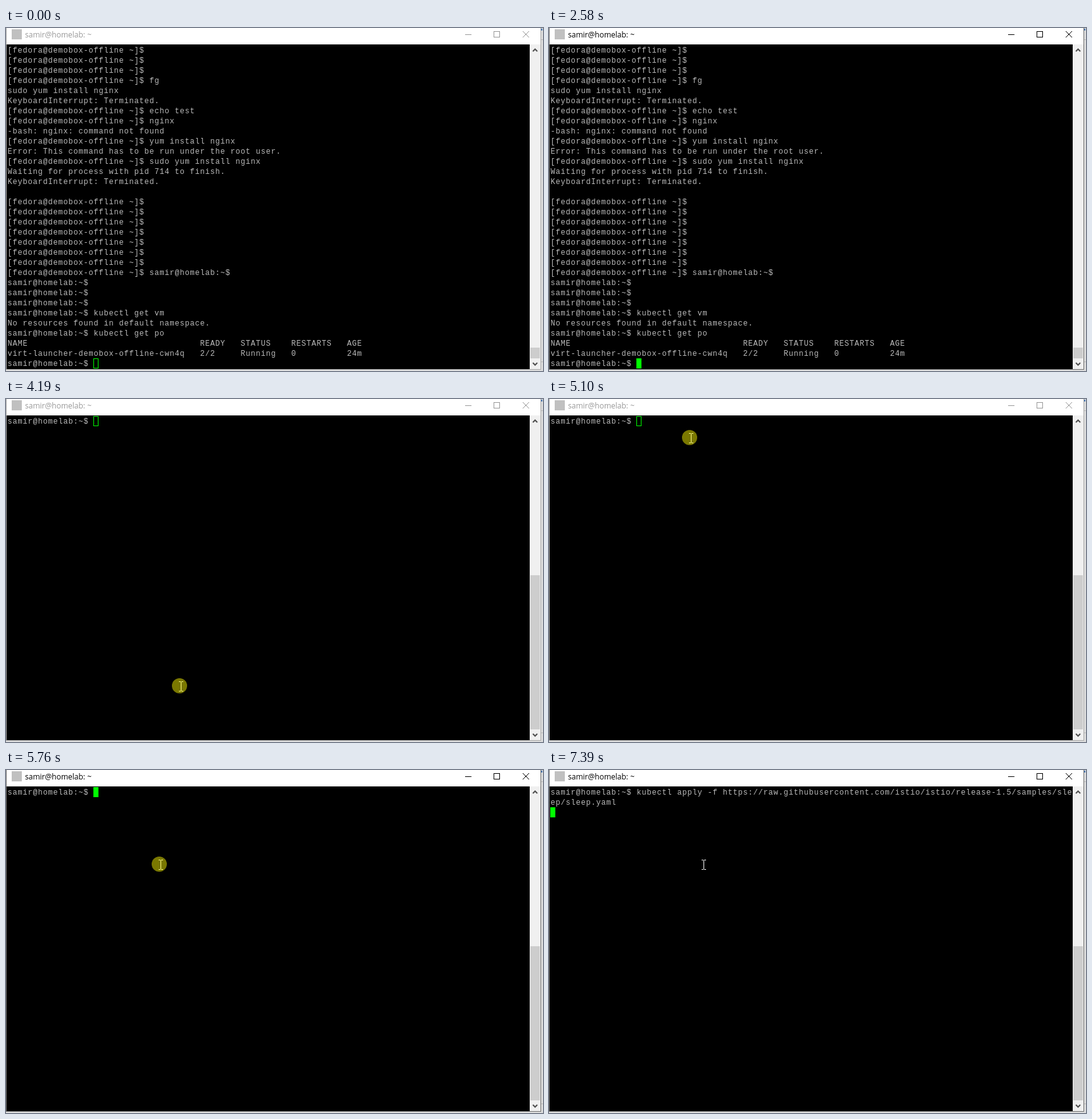
Animation, 848 px wide and 543 px high, one loop 8000 ms. Source, as an HTML page with a canvas:

```html
<!DOCTYPE html>
<html lang="en">
<head>
<meta charset="utf-8">
<title>Terminal session</title>
<style>
  html, body { margin: 0; width: 848px; height: 543px; overflow: hidden; background: #dcdcdc; }
  canvas { display: block; }
</style>
</head>
<body>
<canvas id="stage" width="848" height="543"></canvas>
<script>
const ctx = document.getElementById('stage').getContext('2d');
const LOOP = 8000;
const CELL_W = 8;
const CELL_H = 16;
const COLS = 103;
const USER = 'samir@homelab';
const GUEST = 'demobox-offline';
const shell = USER + ':~$ ';
const remote = `[fedora@${GUEST} ~]$ `;
const repeat = (line, n) => Array(n).fill(line);
const row = (name, ready, status, restarts, age) =>
  name.padEnd(38) + ready.padEnd(8) + status.padEnd(10) + restarts.padEnd(11) + age;

const history = [
  ...repeat(remote, 3),
  remote + 'fg',
  'sudo yum install nginx',
  'KeyboardInterrupt: Terminated.',
  remote + 'echo test',
  remote + 'nginx',
  '-bash: nginx: command not found',
  remote + 'yum install nginx',
  'Error: This command has to be run under the root user.',
  remote + 'sudo yum install nginx',
  'Waiting for process with pid 714 to finish.',
  'KeyboardInterrupt: Terminated.',
  '',
  ...repeat(remote, 7),
  remote + shell,
  ...repeat(shell, 3),
  shell + 'kubectl get vm',
  'No resources found in default namespace.',
  shell + 'kubectl get po',
  row('NAME', 'READY', 'STATUS', 'RESTARTS', 'AGE'),
  row(`virt-launcher-${GUEST}-cwn4q`, '2/2', 'Running', '0', '24m'),
  shell
];
const command = shell + 'kubectl apply -f https://raw.githubusercontent.com/' +
  'istio/istio/release-1.5/samples/sleep/sleep.yaml';
const pasted = [command.slice(0, COLS), command.slice(COLS)];

// Each entry holds until the next: [start ms, value]
const screens = [[0, history], [4190, [shell]], [6140, pasted], [7390, [...pasted, '']]];
const focus = [[0, false], [440, true], [4040, false], [5760, true]];

// Mouse: [start ms, [x, y, highlighted]] or null while hidden
const mouse = [
  [0, null],
  [70, [525, 434, true]], [120, [517, 422, true]], [160, [508, 409, true]],
  [210, [501, 399, true]], [440, [490, 394, true]], [510, [490, 394, false]],
  [1140, [404, 489, false]], [1210, null],
  [2080, [294, 514, false]], [2160, [294, 505, false]],
  [2510, [293, 504, false]], [2580, null],
  [4190, [276, 455, true]], [4260, [241, 258, true]], [4560, [215, 86, true]],
  [5100, [224, 62, true]], [5180, [242, 31, true]], [5260, [257, 13, true]],
  [5350, [264, 22, true]], [5430, [255, 74, true]], [5530, [244, 124, true]],
  [5600, [244, 150, true]], [5990, [244, 150, false]],
  [6140, [244, 150, true]], [6240, [244, 150, false]]
];

const at = (track, t) => track.findLast(([start]) => start <= t)[1];

function box(color, x, y, w, h) {
  ctx.fillStyle = color;
  ctx.fillRect(x, y, w, h);
}

function lines(color, width, ...paths) {
  ctx.strokeStyle = color;
  ctx.lineWidth = width;
  ctx.beginPath();
  for (const path of paths)
    path.forEach(([x, y], i) => i ? ctx.lineTo(x, y) : ctx.moveTo(x, y));
  ctx.stroke();
}

function drawWindow(active, thumbTop) {
  box('#dcdcdc', 0, 0, 848, 543);
  box('#b8b8b8', 845, 18, 3, 1);
  box('#b8b8b8', 845, 528, 3, 1);
  box('#4a7ab5', 845, 1, 2, 3);
  box(active ? '#707070' : '#aaaaaa', 0, 0, 845, 541);
  box('#fff', 1, 0, 843, 26);
  box('#000', 1, 26, 826, 514);

  const ink = active ? '#000' : '#999';
  box('#c0c0c0', 9, 2, 16, 16);
  ctx.fillStyle = ink;
  ctx.font = '12px "Open Sans", "Noto Sans", sans-serif';
  ctx.letterSpacing = '0px';
  ctx.fillText(USER + ': ~', 30, 15);
  box(ink, 725, 10, 10, 1);
  ctx.strokeStyle = ink;
  ctx.lineWidth = 1;
  ctx.strokeRect(770.5, 5.5, 9, 9);
  lines(ink, 1, [[816, 5], [826, 15]], [[826, 5], [816, 15]]);

  box('#f0f0f0', 827, 26, 17, 514);
  box('#cdcdcd', 828, thumbTop, 15, 523 - thumbTop);
  lines('#505050', 2, [[832, 37], [835.5, 33.5], [839, 37]],
    [[832, 530], [835.5, 533.5], [839, 530]]);
}

function drawTerminal(text, active) {
  ctx.fillStyle = '#bbb';
  ctx.font = '12px "Liberation Mono", "DejaVu Sans Mono", monospace';
  ctx.letterSpacing = '0px';
  // Centre each glyph in its terminal cell
  const gap = CELL_W - ctx.measureText('0').width;
  ctx.letterSpacing = gap + 'px';
  text.forEach((line, i) => ctx.fillText(line, 2 + gap / 2, 39 + CELL_H * i));

  const x = 2 + CELL_W * text.at(-1).length;
  const y = 27 + CELL_H * (text.length - 1);
  if (active) return box('#0f0', x, y, CELL_W, CELL_H);
  ctx.strokeStyle = '#0f0';
  ctx.lineWidth = 1;
  ctx.strokeRect(x + .5, y + .5, CELL_W - 1, CELL_H - 1);
}

function drawMouse([x, y, highlighted]) {
  box('#fff', x, y - 7, 1, 14);
  for (const edge of [y - 8, y + 7]) {
    box('#fff', x - 3, edge, 3, 1);
    box('#fff', x + 1, edge, 3, 1);
  }
  if (!highlighted) return;
  ctx.fillStyle = 'rgba(255, 250, 0, .48)';
  ctx.beginPath();
  ctx.arc(x - 2, y - 1, 12, 0, Math.PI * 2);
  ctx.fill();
}

function draw(now) {
  const t = now % LOOP;
  const active = at(focus, t);
  const text = at(screens, t);
  const pointer = at(mouse, t);
  drawWindow(active, text === history ? 506 : 279);
  drawTerminal(text, active);
  if (pointer) drawMouse(pointer);
}

const begin = performance.now();
function tick() {
  draw(performance.now() - begin);
  requestAnimationFrame(tick);
}
tick();
</script>
</body>
</html>
```
